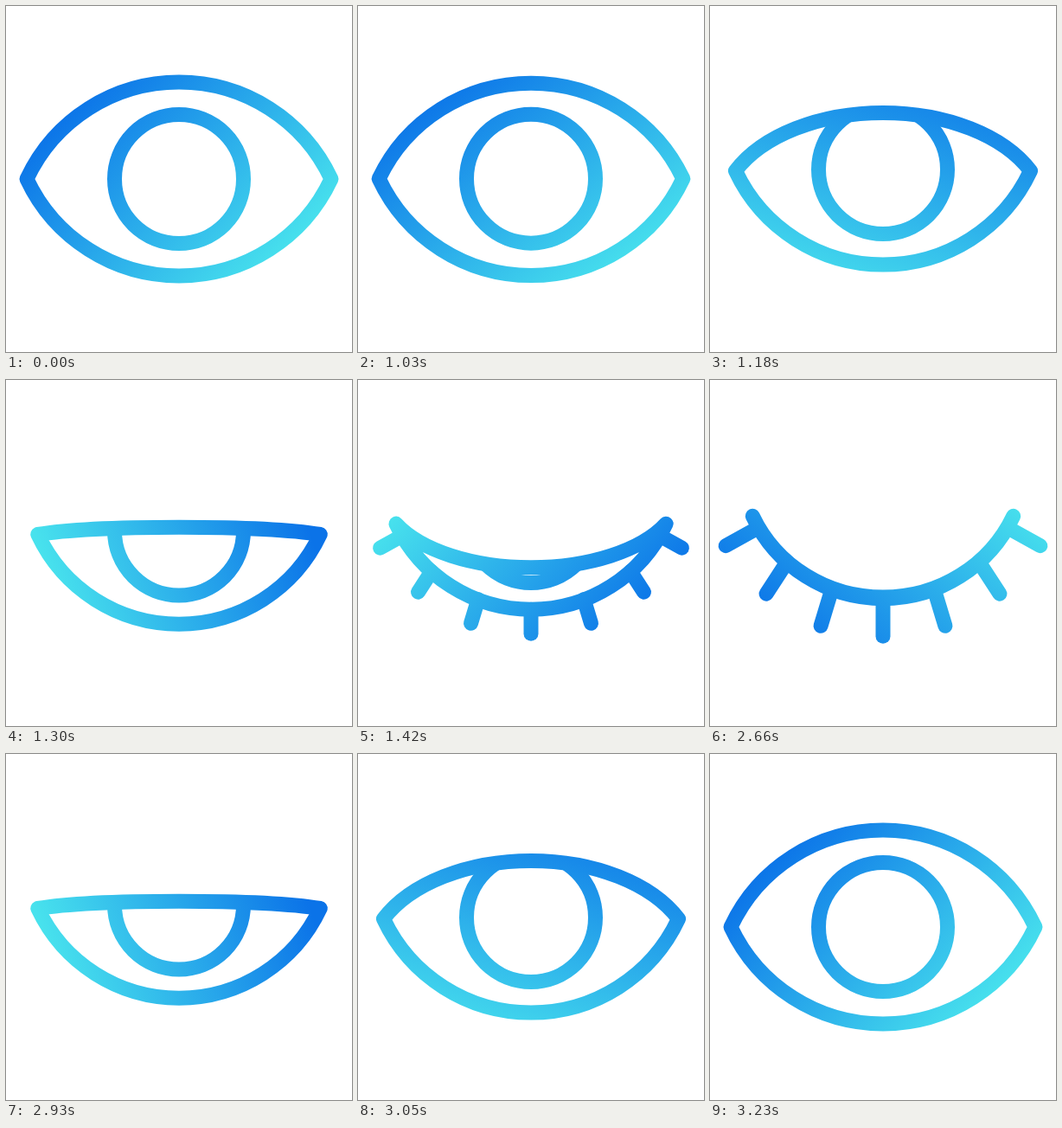
Recreate the animation shown at these times as an HTML page with a canvas. Size 400 by 400 pixels, loop 3260 ms.

```html
<!DOCTYPE html>
<html lang="en">
<head>
<meta charset="utf-8">
<title>Blinking eye</title>
<style>
  html, body { margin: 0; width: 100%; height: 100%; overflow: hidden; background: #fff; }
  canvas { display: block; width: 400px; height: 400px; }
</style>
</head>
<body>
<canvas id="stage" width="400" height="400"></canvas>
<script>
const canvas = document.getElementById('stage');
const ctx = canvas.getContext('2d');
const ratio = window.devicePixelRatio || 1;
canvas.width = canvas.height = 400 * ratio;

const LOOP = 3260, STEP = 30, MOVE = 600;
const CLOSE_AT = 1000, OPEN_AT = 2630;
const MID = 200, STROKE = 17, PUPIL = 74.5;

// Right-hand lashes on the closed lid: root x, root y, end x, end y
const LASHES = [
  [200, 252, 200, 296],
  [259, 241, 272, 284],
  [311, 210, 335, 247],
  [346, 171.5, 382, 191.5]
];

const lerp = (a, b, t) => a + (b - a) * t;
const clamp = v => Math.min(1, Math.max(0, v));
const smooth = v => v * v * (3 - 2 * v);

// 0 = open, 1 = closed, advancing in even steps
function closure(time) {
  const part = start => clamp(Math.floor((time - start) / STEP) * STEP / MOVE);
  return part(CLOSE_AT) - part(OPEN_AT);
}

function gradient(p) {
  const angle = (45 + 175 * p + 110 * p * p) * Math.PI / 180;
  const dx = Math.cos(angle) * 150, dy = Math.sin(angle) * 150;
  const fill = ctx.createLinearGradient(MID - dx, MID - dy, MID + dx, MID + dy);
  fill.addColorStop(0, '#0b73e8');
  fill.addColorStop(1, '#48e2ed');
  return fill;
}

// Adds a lid from one corner to the other; side is 1 left to right, -1 back
function lid(w, y, apex, side) {
  const h = apex - y, corner = MID - side * w, end = MID + side * w;
  const slant = side * w * 0.182, flat = side * w * 0.429;
  ctx.bezierCurveTo(corner + slant, y + h * 0.611, MID - flat, apex, MID, apex);
  ctx.bezierCurveTo(MID + flat, apex, end - slant, y + h * 0.611, end, y);
}

function line(x1, y1, x2, y2) {
  ctx.beginPath();
  ctx.moveTo(x1, y1);
  ctx.lineTo(x2, y2);
  ctx.stroke();
}

function drawPupil(e, w, y, top) {
  ctx.save();
  ctx.beginPath();
  ctx.moveTo(MID - w, y);
  lid(w, y, top, 1);
  ctx.lineTo(400, 400);
  ctx.lineTo(0, 400);
  ctx.clip();
  ctx.beginPath();
  ctx.arc(MID, lerp(200, 149, e), PUPIL, 0, Math.PI * 2);
  ctx.stroke();
  ctx.restore();
}

function drawLashes(p, w, y, bottom) {
  const u = clamp(p * 2 - 1);
  if (!u) return;
  const grow = 1 - (1 - u) * (1 - u);
  for (const [rx, ry, ex, ey] of LASHES) {
    const x = (rx - MID) * w / 150.5;
    const top = y + (ry - 157) * (bottom - y) / 95;
    const dx = (ex - rx) * grow, dy = (ey - ry) * grow;
    line(MID + x, top, MID + x + dx, top + dy);
    if (x) line(MID - x, top, MID - x - dx, top + dy);
  }
}

function draw(time) {
  const p = closure(time), e = smooth(p);
  const w = lerp(176, 150.5, e), y = lerp(200, 157, e);
  const top = lerp(88, 252.3, e), bottom = lerp(312, 252.3, e);

  ctx.setTransform(ratio, 0, 0, ratio, 0, 0);
  ctx.fillStyle = '#fff';
  ctx.fillRect(0, 0, 400, 400);
  ctx.lineWidth = STROKE;
  ctx.lineCap = ctx.lineJoin = 'round';
  ctx.strokeStyle = gradient(p);

  if (p < 1) drawPupil(e, w, y, top);
  drawLashes(p, w, y, bottom);

  ctx.beginPath();
  ctx.moveTo(MID - w, y);
  if (p < 1) {
    lid(w, y, top, 1);
    lid(w, y, bottom, -1);
    ctx.closePath();
  } else {
    lid(w, y, bottom, 1);
  }
  ctx.stroke();
}

const began = performance.now();
function tick() {
  draw((performance.now() - began) % LOOP);
  requestAnimationFrame(tick);
}
tick();
</script>
</body>
</html>
```
